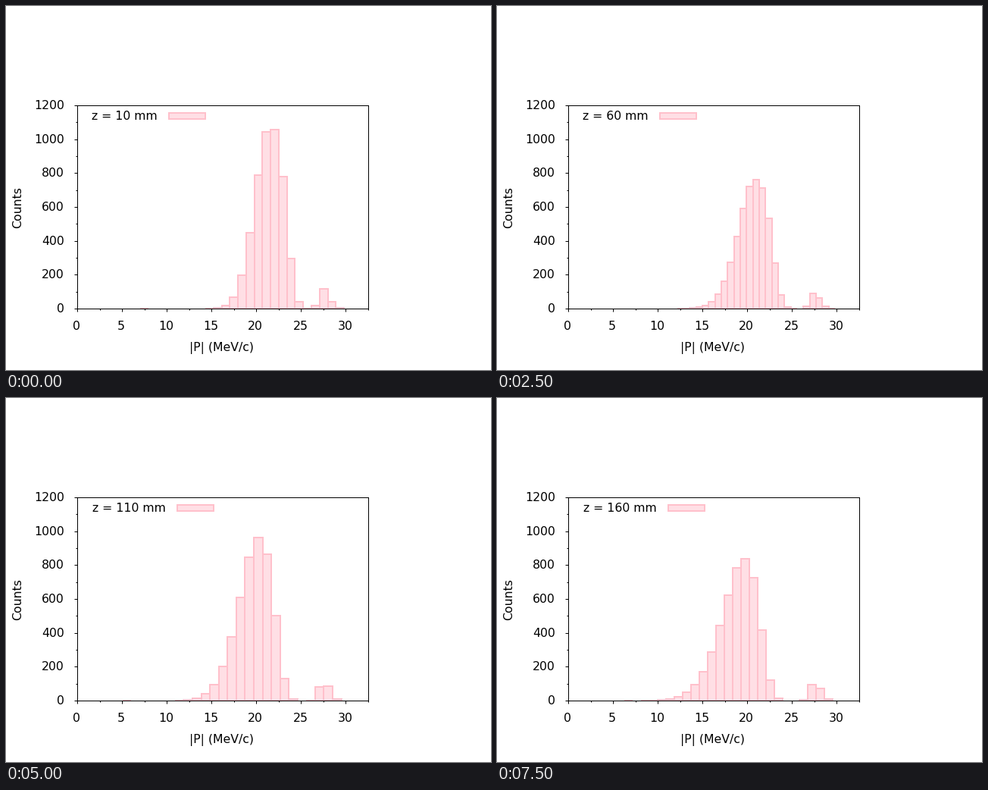
Recreate the animation shown at these times as a matplotlib script. Size 640 px wide and 480 px high, loop 8 s.

```python
import numpy as np
import matplotlib.pyplot as plt
from matplotlib.animation import FuncAnimation
from matplotlib.patches import Rectangle
from matplotlib.ticker import MultipleLocator

PX = 0.9                      # points per pixel at 80 dpi
BINS = 25
LEFT, TOP, WIDTH, HEIGHT = 94, 131, 384, 268
P_MAX, N_MAX = 32.5, 1200
BAR = dict(facecolor="#ffdfe5", edgecolor="#ffc0cb", linewidth=2 * PX,
           joinstyle="miter")
STOPS = (18.45, 112.8, 150.25, 165.8)   # depths where slow particles stop

plt.rcParams.update({"font.family": "DejaVu Sans", "font.size": 15.8 * PX})

p = np.linspace(0, P_MAX, 6501)


def peak(total, mode, left, right, left_pow, right_pow):
    """Cumulative counts of a bump with a different fall-off on each side."""
    d = p - mode
    pdf = np.where(d < 0, np.exp(-np.abs(d / left) ** left_pow),
                   np.exp(-np.abs(d / right) ** right_pow))
    return total * np.cumsum(pdf) / pdf.sum()


def histogram(z):
    # the slowest moving particle sets the start of the range
    stop = next(s for s in STOPS if s > z)
    low = 3.7 * (stop - z) ** 0.3
    high = 29.8 if z <= 60 else 29.5
    edges = np.linspace(low, high, BINS + 1)

    # the main peak slows down and widens with depth
    t = (z - 10) / 150
    beam = peak(4740 - 0.8 * z, 21.5 - 2.1 * t, 2.3 + 0.9 * t,
                2.15 + 0.33 * t, 1.9 - 0.3 * t, 3)
    fast = peak(181, 27.5, 0.55, 0.75, 2, 1.5)
    counts = np.round(np.diff(np.interp(edges, p, beam + fast)))
    counts[[0, -1]] = np.maximum(counts[[0, -1]], 1)
    return edges, counts


fig = plt.figure(figsize=(8, 6), dpi=80, facecolor="white")

ax = fig.add_axes([LEFT / 640, 1 - (TOP + HEIGHT) / 480,
                   WIDTH / 640, HEIGHT / 480])
ax.set(xlim=(0, P_MAX), ylim=(0, N_MAX))
for axis, major in ((ax.xaxis, 5), (ax.yaxis, 200)):
    axis.set_major_locator(MultipleLocator(major))
    axis.set_minor_locator(MultipleLocator(major / 2))
ax.tick_params(which="both", width=PX, labelleft=False, labelbottom=False)
ax.tick_params(which="major", length=4 * PX)
ax.tick_params(which="minor", length=2 * PX)
for spine in ax.spines.values():
    spine.set_linewidth(PX)

# overlay in pixel coordinates, y downwards
stage = fig.add_axes([0, 0, 1, 1])
stage.set(xlim=(0, 640), ylim=(480, 0))
stage.axis("off")


def label(x, y, text, ha="center", **kw):
    return stage.text(x, y, text, ha=ha, va="baseline", **kw)


for v in range(0, 31, 5):
    label(LEFT - 1 + v * WIDTH / P_MAX, 427, str(v))
for v in range(0, N_MAX + 1, 200):
    label(77, TOP + HEIGHT + 5 - v * HEIGHT / N_MAX, str(v), ha="right")
label(285, 455, "|P| (MeV/c)")
label(20, 265.3, "Counts", rotation=90, rotation_mode="anchor")

title = label(113, 150, "", ha="left")
key = stage.add_patch(Rectangle((215, 141), 48, 8, **BAR))
bars = [ax.add_patch(Rectangle((0, 0), 1, 0, **BAR)) for _ in range(BINS)]


def update(i):
    z = 10 * (i + 1)
    wide = z >= 100
    title.set_text(f"z = {z} mm")
    title.set_x(114 if wide else 113)
    key.set_x(226 if wide else 215)
    edges, counts = histogram(z)
    for bar, x, w, n in zip(bars, edges, np.diff(edges), counts):
        bar.set_bounds(x, 0, w, n)
        bar.set_visible(n > 0)
    return [title, key, *bars]


anim = FuncAnimation(fig, update, frames=16, interval=500, repeat=True,
                     repeat_delay=0, blit=False)
plt.show()
```
